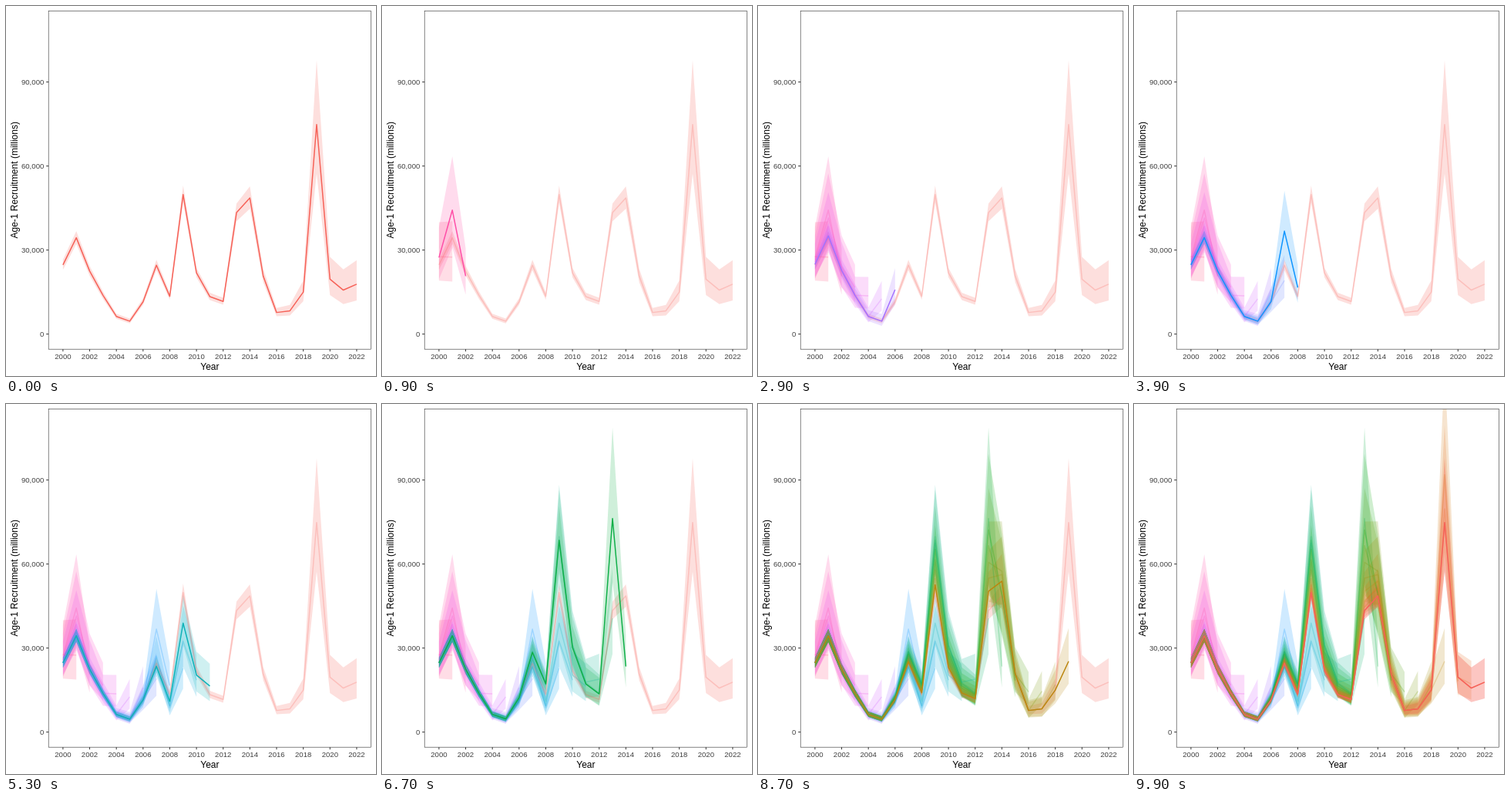
Recreate the animation shown at these times as an HTML page. Size 480 by 480 pixels, loop 10 s.

```html
<!DOCTYPE html>
<html lang="en">
<head>
<meta charset="utf-8">
<title>Recruitment estimates by year</title>
<style>
html, body { margin: 0; width: 100%; height: 100%; overflow: hidden; background: #fff; }
svg { display: block; width: 100vw; height: 100vh; }
text { font-family: "Liberation Sans", Arial, sans-serif; }
.tick { font-size: 9.6px; fill: #404040; }
.title { font-size: 12px; fill: #000; text-anchor: middle; }
</style>
</head>
<body>
<svg id="stage" viewBox="0 0 480 480">
  <defs><clipPath id="panel"><rect x="55" y="6.5" width="418.5" height="438.5"/></clipPath></defs>
  <rect width="480" height="480" fill="#fff"/>
  <g clip-path="url(#panel)"><g id="ribbons"></g><g id="lines"></g></g>
  <rect x="55.2" y="6.4" width="418.3" height="438.8" fill="none" stroke="#333" stroke-width="0.6"/>
  <g id="axes"></g>
  <text class="title" x="264.4" y="472">Year</text>
  <text class="title" transform="translate(15 225.8) rotate(-90)">Age-1 Recruitment (millions)</text>
</svg>
<script>
const FIRST = 2000, LAST = 2022, LOOP = 10000;
const $ = id => document.getElementById(id);
const px = year => 73.9 + (year - FIRST) * 17.32;
const py = v => 425.6 - v * 109 / 30;
const bell = z => Math.exp(-z * z);

// Latest estimates, in thousands
const base = [24.7, 34.4, 22.5, 13.8, 6.3, 4.6, 11.5, 24.5, 13.4, 49.4, 21.7, 13.3,
  11.6, 42, 48, 20.7, 7.7, 8.3, 15, 74.7, 19.6, 15.7, 18.4];

// Misjudged years: a bias appears with one assessment and fades over the next ones
const biases = [
  { year: 2001, width: 1, since: 2001, fade: 3, size: .32 },
  { year: 2007, width: .5, since: 2008, fade: 1, size: .5 },
  { year: 2008.6, width: 1.2, since: 2009, fade: 2.5, size: -.45 },
  { year: 2009.5, width: 2.6, since: 2012, fade: 5, size: .48 },
  { year: 2013, width: .5, since: 2013, fade: 5, size: .78 },
  { year: 2014, width: .5, since: 2017, fade: 3, size: .18 },
  { year: 2019, width: .5, since: 2020, fade: .9, size: .23 }
];

function biasOf(year, peel) {
  return biases.filter(b => peel >= b.since).reduce((sum, b) =>
    sum + b.size * bell((year - b.year) / b.width) * bell((peel - b.since) / b.fade), 0);
}

// The newest year of an assessment is pulled towards the average
function estimate(year, peel) {
  const v = base[year - FIRST], bias = biasOf(year, peel);
  return year === peel ? 8.6 * v ** .25 * (1 + Math.max(0, bias)) : v * (1 + bias);
}

function series(peel) {
  const settle = peel > 2004 && peel < 2012 ? 2.5 : 4.8;
  const points = [];
  for (let year = FIRST; year <= peel; year++) {
    const v = estimate(year, peel);
    const spread = .05 + .6 / v + .31 * bell((peel - year) / settle);
    points.push({ x: px(year), mid: py(v), hi: py(v * Math.exp(spread)), lo: py(v * Math.exp(-spread)) });
  }
  return points;
}

// Even hue wheel at luminance 65 and chroma 100, slightly deepened
function hue(peel) {
  const h = (15 + 360 * (LAST - peel) / 22) * Math.PI / 180;
  const Y = (81 / 116) ** 3;
  const u = .1978 + 100 * Math.cos(h) / 845, v = .4683 + 100 * Math.sin(h) / 845;
  const X = 9 * Y * u / (4 * v), Z = Y * (12 - 3 * u - 20 * v) / (4 * v);
  const rgb = [
    3.2406 * X - 1.5372 * Y - .4986 * Z,
    -.9689 * X + 1.8758 * Y + .0415 * Z,
    .0557 * X - .204 * Y + 1.057 * Z
  ].map(c => {
    const lin = Math.min(1, Math.max(0, c));
    const s = lin <= .0031308 ? 12.92 * lin : 1.055 * lin ** (1 / 2.4) - .055;
    return Math.round(255 * Math.max(.06, s ** 1.25));
  });
  return `rgb(${rgb})`;
}

function add(parent, tag, attrs, text) {
  const el = document.createElementNS("http://www.w3.org/2000/svg", tag);
  for (const key in attrs) el.setAttribute(key, attrs[key]);
  if (text) el.textContent = text;
  return parent.appendChild(el);
}

function drawPeel(peel) {
  const pts = series(peel), color = hue(peel);
  const path = (list, key) => list.map(p => `${p.x.toFixed(2)},${p[key].toFixed(2)}`).join(" ");
  const ribbon = add($("ribbons"), "polygon", {
    points: path(pts, "hi") + " " + path([...pts].reverse(), "lo"),
    fill: color, "fill-opacity": .2
  });
  const line = add($("lines"), "polyline", {
    points: path(pts, "mid"), fill: "none", stroke: color,
    "stroke-width": 1.5, "stroke-linejoin": "round"
  });
  return { ribbon, line };
}

function drawAxes() {
  const g = $("axes"), stroke = "#333";
  for (let year = FIRST; year <= LAST; year += 2) {
    const x = px(year);
    add(g, "line", { x1: x, x2: x, y1: 445.2, y2: 448.2, stroke });
    add(g, "text", { class: "tick", x, y: 457.8, "text-anchor": "middle" }, String(year));
  }
  for (let v = 0; v <= 90; v += 30) {
    const y = py(v);
    add(g, "line", { x1: 52.2, x2: 55.2, y1: y, y2: y, stroke });
    add(g, "text", { class: "tick", x: 49.3, y: y + 3.5, "text-anchor": "end" }, v ? v + ",000" : "0");
  }
}

drawAxes();
const peels = [drawPeel(LAST)];
for (let year = 2001; year <= LAST; year++) peels.push(drawPeel(year));

// Start time of every step
const starts = [0];
for (let i = 0; i < 22; i++) {
  const long = i > 0 && i < 10 || i === 11 || i === 12;
  starts.push(starts[i] + (long ? 500 : 400));
}

let shown = -1;
function render(time) {
  const step = starts.filter(s => s <= time).length - 1;
  if (step === shown) return;
  shown = step;
  peels.forEach(({ ribbon, line }, i) => {
    const display = i <= step ? "inline" : "none";
    ribbon.style.display = line.style.display = display;
    line.style.strokeOpacity = i === step ? 1 : .25;
  });
}

const begin = performance.now();
function tick() {
  render((performance.now() - begin) % LOOP);
  requestAnimationFrame(tick);
}
tick();
</script>
</body>
</html>
```
